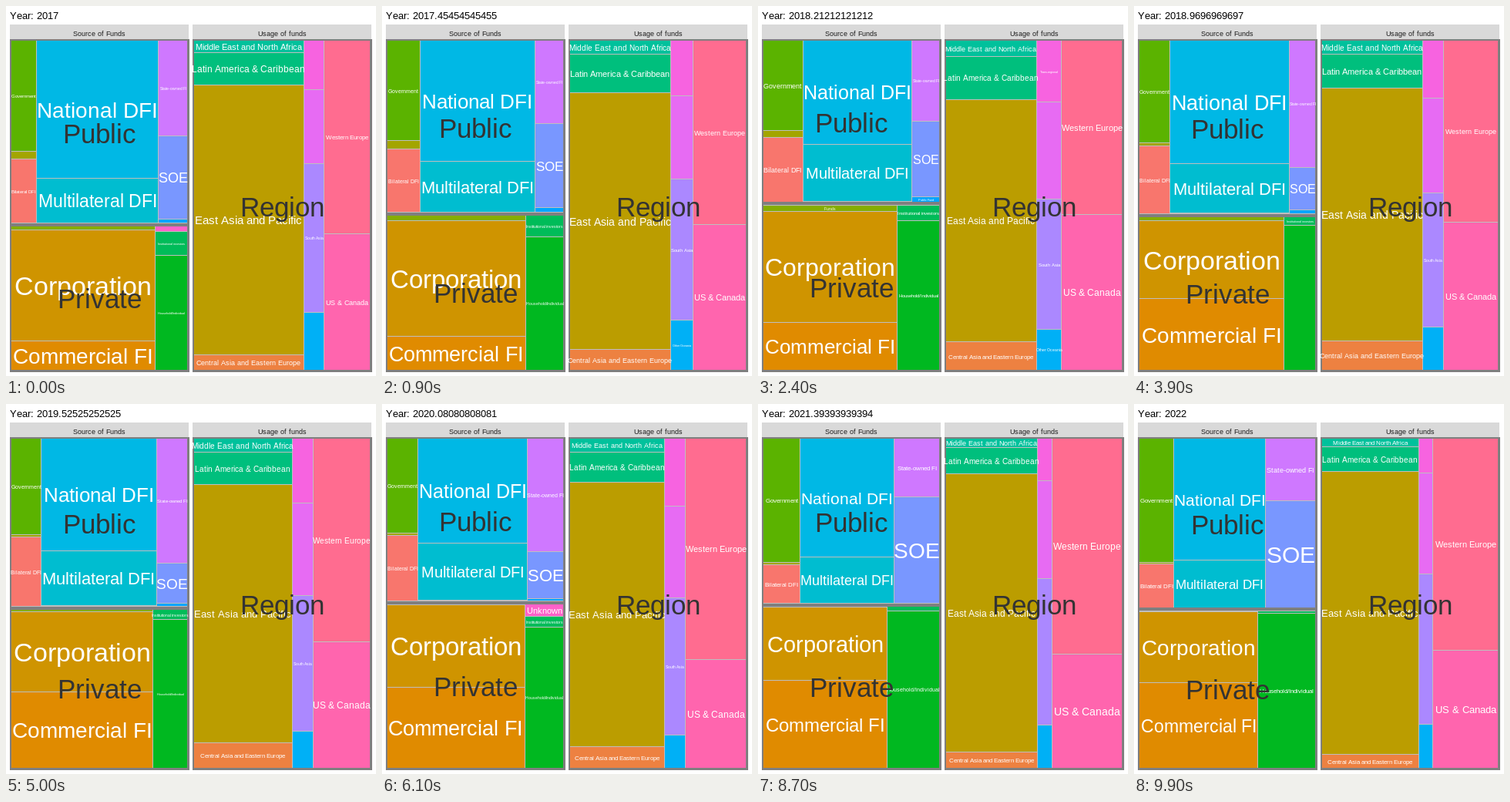
An HTML page that plays this animation: 480x480 px, repeating every 10 s.

```html
<!DOCTYPE html>
<html lang="en">
<head>
<meta charset="utf-8">
<title>Source and usage of funds</title>
<style>
  html, body { margin: 0; width: 100%; height: 100%; overflow: hidden; background: #fff; }
  svg { display: block; width: 480px; height: 480px; }
  text { font-family: "Liberation Sans", Arial, sans-serif; }
  rect, path { shape-rendering: crispEdges; }
</style>
</head>
<body>
<svg id="stage" viewBox="0 0 480 480">
  <defs>
    <clipPath id="panels"><path d="M5 43H238V475H5zM242 43H475V475H242z"/></clipPath>
  </defs>
</svg>
<script>
const stage = document.getElementById("stage");
const FRAMES = 100, FRAME_MS = 100, YEARS = 5;
const TOP = 44.5, BOTTOM = 472.5;

// Alphabetical order sets the hue of each category.
const categories = [
  "Bilateral DFI", "Central Asia and Eastern Europe", "Commercial FI", "Corporation",
  "East Asia and Pacific", "Export Credit", "Funds", "Government", "Household/Individual",
  "Institutional investors", "Latin America & Caribbean", "Middle East and North Africa",
  "Multilateral Climate Funds", "Multilateral DFI", "National DFI", "Other Oceania",
  "Public Fund", "SOE", "South Asia", "State-owned FI", "Sub-Saharan Africa",
  "Trans-regional", "Unknown", "US & Canada", "Western Europe"
];
const unlabelled = new Set(["Export Credit", "Multilateral Climate Funds"]);

// Relative sum of all funds per year: amounts blend linearly, so shares lean to the larger year.
const totals = [600, 520, 630, 680, 1100, 1450];

// Tile edges for each year from 2017 to 2022, in pixels.
const edges = {
  split:       [283.5, 251.2, 272.5, 258.3, 255.8, 266],
  publicLeft:  [39.5, 62.2, 46.1, 45, 57.1, 51.5],
  publicRight: [197.5, 199, 201.6, 189.5, 181.7, 170.5],
  government:  [188.5, 156.1, 178.1, 162.1, 205.5, 205.5],
  exportCredit:[198.5, 166.6, 181.9, 165, 209.4, 207.5],
  national:    [223.5, 170.6, 205.4, 178.4, 195.1, 202.5],
  climateH:    [0, 1.3, 1.6, 1.6, 0, 0],
  stateOwned:  [168.5, 129.4, 211.6, 202.3, 116.2, 125.5],
  publicFundH: [5, 7.8, 5.5, 4, 0, 0],
  privateMid:  [193.5, 176, 195, 187.2, 173.5, 160.5],
  fundsH:      [5, 9.4, 4.4, 0.6, 1, 1],
  corporation: [434.5, 420.5, 378.4, 369.2, 355.9, 361.5],
  investorsH:  [31, 22.8, 10.7, 14.8, 8.1, 3.5],
  regionLeft:  [386.5, 357.4, 375, 367.9, 356.5, 369.5],
  regionRight: [412.5, 390.9, 401.8, 396, 376.3, 387.5],
  middleEast:  [60.5, 66.3, 62.4, 63.2, 57.4, 55.5],
  latin:       [102.5, 126, 106, 102.7, 93.1, 87.5],
  eastAsia:    [452.5, 436.3, 434.5, 443.9, 448.9, 454.5],
  trans:       [108.5, 126.4, 119.3, 136, 108.1, 89.5],
  subSaharan:  [204.5, 253, 242.3, 254.3, 231.7, 220.5],
  southAsia:   [397.5, 421, 416.4, 431.2, 417.4, 415.5],
  western:     [295.5, 266.8, 280.9, 331.9, 328.8, 319.5]
};

function add(parent, tag, attrs = {}) {
  const node = document.createElementNS("http://www.w3.org/2000/svg", tag);
  for (const key in attrs) node.setAttribute(key, attrs[key]);
  return parent.appendChild(node);
}

// Evenly spaced hue in polar LUV with chroma 100 and lightness 65.
function hueColor(index) {
  const angle = (15 + 360 * index / categories.length) * Math.PI / 180;
  const u = 100 * Math.cos(angle) / 845 + 0.1978;
  const v = 100 * Math.sin(angle) / 845 + 0.4683;
  const Y = (81 / 116) ** 3;
  const X = 9 * Y * u / (4 * v);
  const Z = Y * (12 - 3 * u - 20 * v) / (4 * v);
  const channels = [
    3.2406 * X - 1.5372 * Y - 0.4986 * Z,
    -0.9689 * X + 1.8758 * Y + 0.0415 * Z,
    0.0557 * X - 0.2040 * Y + 1.0570 * Z
  ].map(c => {
    const s = c > 0.0031308 ? 1.055 * c ** (1 / 2.4) - 0.055 : 12.92 * c;
    return Math.round(255 * Math.min(1, Math.max(0, s)));
  });
  return `rgb(${channels})`;
}

const pen = document.createElement("canvas").getContext("2d");
pen.font = '1000px "Liberation Sans", Arial, sans-serif';
const advances = {};
const advance = ch => advances[ch] ??= pen.measureText(ch).width / 1000;

// Text is set with whole-pixel advances.
const steps = (text, size) => [...text].map(ch => Math.round(advance(ch) * size));
const sum = list => list.reduce((a, b) => a + b, 0);

// Anchor 0 is left, 0.5 is centred.
function setText(node, text, x, baseline, size, anchor = 0.5) {
  const widths = steps(text, size);
  let pos = Math.round(x - anchor * sum(widths));
  node.setAttribute("x", widths.map(w => (pos += w) - w).join(" "));
  node.setAttribute("y", Math.round(baseline));
  node.setAttribute("font-size", size);
  if (node.textContent !== text) node.textContent = text;
}

const title = add(stage, "text", { fill: "#000" });
for (const [x, label] of [[5, "Source of Funds"], [242, "Usage of funds"]]) {
  add(stage, "rect", { x, y: 24, width: 232, height: 19, fill: "#d9d9d9" });
  setText(add(stage, "text", { fill: "#1a1a1a" }), label, x + 116, 39, 9);
}

const plot = add(stage, "g", { "clip-path": "url(#panels)" });
const tileLayer = add(plot, "g", { stroke: "#bebebe", "stroke-width": 1 });
add(plot, "path", {
  d: "M5.5 43.5H236.5V473.5H5.5zM242.5 43.5H473.5V473.5H242.5z",
  fill: "none", stroke: "#7f7f7f", "stroke-width": 3
});
const splitBar = add(plot, "rect", { x: 5, width: 232, height: 4, fill: "#7f7f7f" });
const labelLayer = add(plot, "g", { fill: "#fff" });
const groupLayer = add(plot, "g", { fill: "#333" });

const BASE_SIZE = 12;
const tiles = {};
categories.forEach((name, i) => {
  tiles[name] = {
    box: add(tileLayer, "rect", { fill: hueColor(i) }),
    label: add(labelLayer, "text"),
    em: sum(steps(name, BASE_SIZE)) / BASE_SIZE
  };
});
const groups = ["Public", "Private", "Region"].map(name => ({ name, node: add(groupLayer, "text") }));

const snap = v => Math.floor(v) + 0.5;

function placeTile(name, x0, x1, y0, y1) {
  const { box, label, em } = tiles[name];
  const w = x1 - x0, h = y1 - y0;
  const left = snap(x0), top = snap(y0);
  box.style.display = h > 0.4 ? "" : "none";
  box.setAttribute("x", left);
  box.setAttribute("y", top);
  box.setAttribute("width", Math.max(0, snap(x1) - left));
  box.setAttribute("height", Math.max(0, snap(y1) - top));

  const fit = Math.min((w - 2) / em, h - 3);
  const visible = fit >= 4.1 && !unlabelled.has(name);
  label.style.display = visible ? "" : "none";
  if (visible) {
    const size = Math.round(fit);
    setText(label, name, (x0 + x1) / 2, (y0 + y1) / 2 + 0.358 * size + 0.5, size);
  }
}

// Stacks tiles from top to bottom between successive y edges.
function column(x0, x1, ys, names) {
  names.forEach((name, i) => placeTile(name, x0, x1, ys[i], ys[i + 1]));
}

// "Unknown" exists only in 2017 and from 2020 to 2021.
function unknownHeight(time) {
  if (time === 0) return 6.8;
  return time >= 3 && time <= 4 ? 15.5 : 0;
}

function draw(frame) {
  const time = YEARS * frame / (FRAMES - 1);
  const from = Math.min(YEARS - 1, Math.floor(time)), part = time - from;
  const before = totals[from] * (1 - part), after = totals[from + 1] * part;
  const share = after / (before + after);
  const e = {};
  for (const key in edges) {
    const [a, b] = edges[key].slice(from, from + 2);
    e[key] = a + (b - a) * share;
  }

  const publicEnd = e.split - 2, privateStart = e.split + 2;
  column(6.5, e.publicLeft, [TOP, e.government, e.exportCredit, publicEnd],
    ["Government", "Export Credit", "Bilateral DFI"]);
  column(e.publicLeft, e.publicRight, [TOP, e.national, publicEnd - e.climateH, publicEnd],
    ["National DFI", "Multilateral DFI", "Multilateral Climate Funds"]);
  column(e.publicRight, 236, [TOP, e.stateOwned, publicEnd - e.publicFundH, publicEnd],
    ["State-owned FI", "SOE", "Public Fund"]);

  const investors = privateStart + unknownHeight(time);
  column(6.5, e.privateMid, [privateStart, privateStart + e.fundsH, e.corporation, BOTTOM],
    ["Funds", "Corporation", "Commercial FI"]);
  column(e.privateMid, 236, [privateStart, investors, investors + e.investorsH, BOTTOM],
    ["Unknown", "Institutional investors", "Household/Individual"]);

  column(243, e.regionLeft, [TOP, e.middleEast, e.latin, e.eastAsia, BOTTOM],
    ["Middle East and North Africa", "Latin America & Caribbean", "East Asia and Pacific",
      "Central Asia and Eastern Europe"]);
  column(e.regionLeft, e.regionRight, [TOP, e.trans, e.subSaharan, e.southAsia, BOTTOM],
    ["Trans-regional", "Sub-Saharan Africa", "South Asia", "Other Oceania"]);
  column(e.regionRight, 473, [TOP, e.western, BOTTOM], ["Western Europe", "US & Canada"]);

  splitBar.setAttribute("y", Math.round(e.split - 2));
  const centres = [[121, (TOP + e.split) / 2], [121, (e.split + BOTTOM) / 2], [358, 259]];
  groups.forEach(({ name, node }, i) => setText(node, name, centres[i][0], centres[i][1] + 13.5, 35));
  setText(title, "Year: " + parseFloat((2017 + time).toPrecision(15)), 5, 17, 13, 0);
}

const start = performance.now();
let shown = -1;
function tick(now) {
  const frame = Math.floor(Math.max(0, now - start) / FRAME_MS) % FRAMES;
  if (frame !== shown) draw(shown = frame);
  requestAnimationFrame(tick);
}
draw(shown = 0);
requestAnimationFrame(tick);
</script>
</body>
</html>
```
